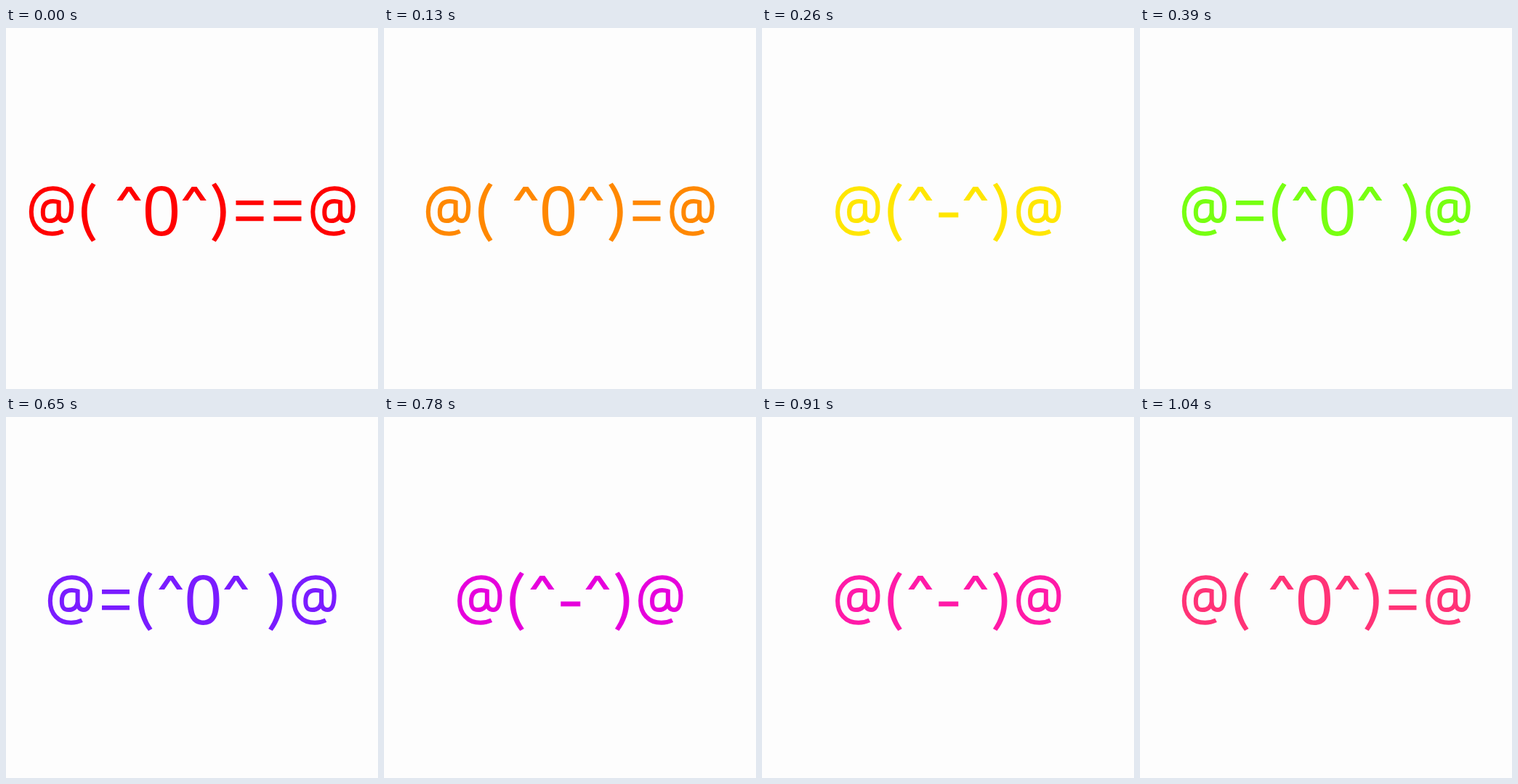
These frames come from a looping animation (512x498 px, 1170 ms). An HTML page:

```html
<!DOCTYPE html>
<html lang="en">
<head>
<meta charset="utf-8">
<title>Dancing kaomoji</title>
<style>
  html, body { margin: 0; width: 100%; height: 100%; overflow: hidden; background: #fdfdfd; }
  #stage { position: relative; width: 100%; height: 100%; overflow: clip; contain: strict; }
  #strip {
    display: block; position: absolute; top: 0; left: 0;
    width: 512px; height: 4482px;
    animation: flip 1170ms steps(9, end) infinite;
  }
  @keyframes flip { to { transform: translateY(-4482px); } }
</style>
</head>
<body>
<div id="stage">
<svg id="strip" viewBox="0 0 512 4482" role="img" aria-label="@( ^0^)==@">
  <defs>
    <g id="at" fill="none" stroke="currentColor" stroke-width="6">
      <path d="M47 280.4C42.5 282.6 37.5 283.8 32 283.8C14 283.8 3.2 271.5 3.2 253.5C3.2 235 15.5 221.2 33 221.2C49 221.2 58.6 231.5 58.6 246C58.6 258.5 55.5 266 49.4 266C44 266 41.2 262.5 41 255L41 240.4C38.5 239.5 36 239 33 239C24 239 19.2 243.8 19.2 254C19.2 262.8 22 266 28.4 266C35.5 266 40.2 262 41 255"/>
    </g>
    <path id="open" d="M14 213.5L19.5 216.5C11 229 7.6 240.5 7.6 254C7.6 267.5 11 279.5 19.5 292L14 295C5 283 0 269 0 254C0 239 5 225.5 14 213.5Z"/>
    <use id="close" href="#open" transform="matrix(-1 0 0 1 19.7 0)"/>
    <path id="caret" d="M13.2 219H20L33.3 238H25.2L16.6 225.2L8 238H0Z"/>
    <path id="mouth" fill-rule="evenodd" d="M22 218C37 218 44 229 44 252.5C44 276 37 287 22 287C7 287 0 276 0 252.5C0 229 7 218 22 218ZM22 224.5C12 224.5 8 233 8 252.5C8 272 12 280.5 22 280.5C32 280.5 36 272 36 252.5C36 233 32 224.5 22 224.5Z"/>
    <path id="arm" d="M0 238H38V244.2H0ZM0 260H38V266.2H0Z"/>
    <path id="dash" d="M0 254.5H27V261.3H0Z"/>
  </defs>
</svg>
</div>
<script>
  // character: [shape, left bearing, advance]
  const glyphs = {
    "@": ["at", 5.6, 73],
    "(": ["open", 5, 28.5],
    ")": ["close", 2, 28.5],
    "^": ["caret", 4.5, 43],
    "0": ["mouth", 1, 47],
    "=": ["arm", 7, 52],
    "-": ["dash", 3.5, 33],
    " ": [null, 0, 20.5]
  };

  const poses = [
    ["@( ^0^)==@", "#ff0000"],
    ["@( ^0^)=@", "#ff8800"],
    ["@(^-^)@", "#ffe600"],
    ["@=(^0^ )@", "#77ff11"],
    ["@==(^0^ )@", "#0088ff"],
    ["@=(^0^ )@", "#7a1cff"],
    ["@(^-^)@", "#e600dc"],
    ["@(^-^)@", "#ff1aa8"],
    ["@( ^0^)=@", "#ff3377"]
  ];

  const center = 256.25, rowHeight = 498;
  const strip = document.getElementById("strip");

  function add(parent, tag, attrs) {
    const el = document.createElementNS("http://www.w3.org/2000/svg", tag);
    for (const key in attrs) el.setAttribute(key, attrs[key]);
    return parent.appendChild(el);
  }

  poses.forEach(([text, color], row) => {
    const chars = [...text].map(c => glyphs[c]);
    const width = chars.reduce((sum, g) => sum + g[2], 0);
    const line = add(strip, "g", {
      color, fill: color, transform: `translate(0 ${row * rowHeight})`
    });
    let pen = center - width / 2;
    for (const [shape, bearing, advance] of chars) {
      if (shape) add(line, "use", { href: "#" + shape, x: pen + bearing });
      pen += advance;
    }
  });
</script>
</body>
</html>
```
